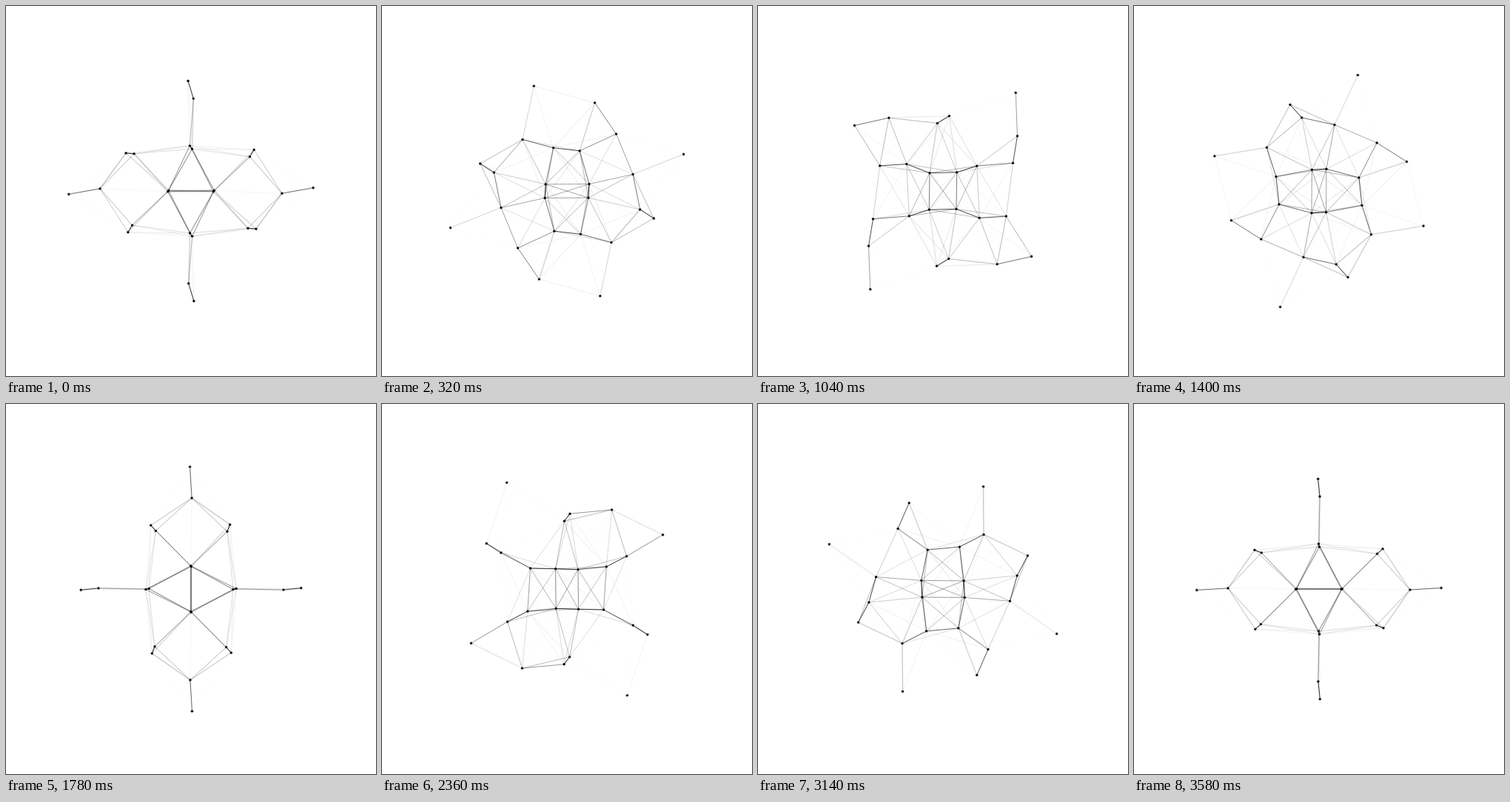
Animation, 500 px wide and 500 px high, one loop 3.6 s. Source, as an HTML page with a canvas:

```html
<!DOCTYPE html>
<html lang="en">
<head>
<meta charset="utf-8">
<title>Counter-rotating network</title>
<style>
  html, body { margin: 0; width: 100%; height: 100%; overflow: hidden; background: #fff; }
  canvas { display: block; width: 500px; height: 500px; }
</style>
</head>
<body>
<canvas id="stage" width="500" height="500"></canvas>
<script>
const SIZE = 500, MID = SIZE / 2;
const LOOP = 3600, STEP = 20;
const REACH = 100, DOT = 1.65;
const SAMPLES = 5, SHUTTER = 0.6;
const RAD = Math.PI / 180;
const TILT = Math.atan(2 / (1 + Math.sqrt(5))) / RAD;

const stage = document.getElementById('stage').getContext('2d');
const layer = document.createElement('canvas');
layer.width = layer.height = SIZE;
const ctx = layer.getContext('2d');

// Two sets of [radius, start angle], turning against each other
const ring = (spin, [outer, inner, tall, low, diagonal]) => [
  [outer, 0], [inner, 0], [tall, 90], [low, 90], [diagonal, TILT], [diagonal, -TILT]
].map(([r, angle]) => ({ r, angle, spin }));

const orbits = [
  ...ring(-1, [165.2, 31.4, 148.8, 61.2, 101.8]),
  ...ring(1, [123, 30.3, 125, 56.9, 91.9])
];

function place(turn) {
  return orbits.flatMap(({ r, angle, spin }) => {
    const a = (angle + spin * turn) * RAD;
    const x = r * Math.cos(a), y = r * Math.sin(a);
    return [[MID + x, MID + y], [MID - x, MID - y]];
  });
}

function drawNet(turn) {
  const points = place(turn);
  ctx.globalAlpha = 1;
  ctx.fillStyle = '#fff';
  ctx.fillRect(0, 0, SIZE, SIZE);
  ctx.fillStyle = ctx.strokeStyle = '#000';
  ctx.lineWidth = 1;

  points.forEach(([x, y], i) => {
    for (const [px, py] of points.slice(i + 1)) {
      const near = 1 - Math.hypot(px - x, py - y) / REACH;
      if (near <= 0) continue;
      ctx.globalAlpha = near * near * (3 - 2 * near);
      ctx.beginPath();
      ctx.moveTo(x, y);
      ctx.lineTo(px, py);
      ctx.stroke();
    }
  });

  ctx.globalAlpha = 1;
  for (const [x, y] of points) {
    ctx.beginPath();
    ctx.arc(x, y, DOT, 0, 2 * Math.PI);
    ctx.fill();
  }
}

function render(now) {
  const tick = Math.floor(((now + 1) % LOOP) / STEP);
  const turn = tick * 180 * STEP / LOOP + 1.5;
  // Average several moments for a soft motion blur
  for (let k = 0; k < SAMPLES; k++) {
    drawNet(turn + SHUTTER * ((k + 0.5) / SAMPLES - 0.5));
    stage.globalAlpha = 1 / (k + 1);
    stage.drawImage(layer, 0, 0);
  }
}

function loop(now) {
  render(now);
  requestAnimationFrame(loop);
}

render(0);
requestAnimationFrame(loop);
</script>
</body>
</html>
```
